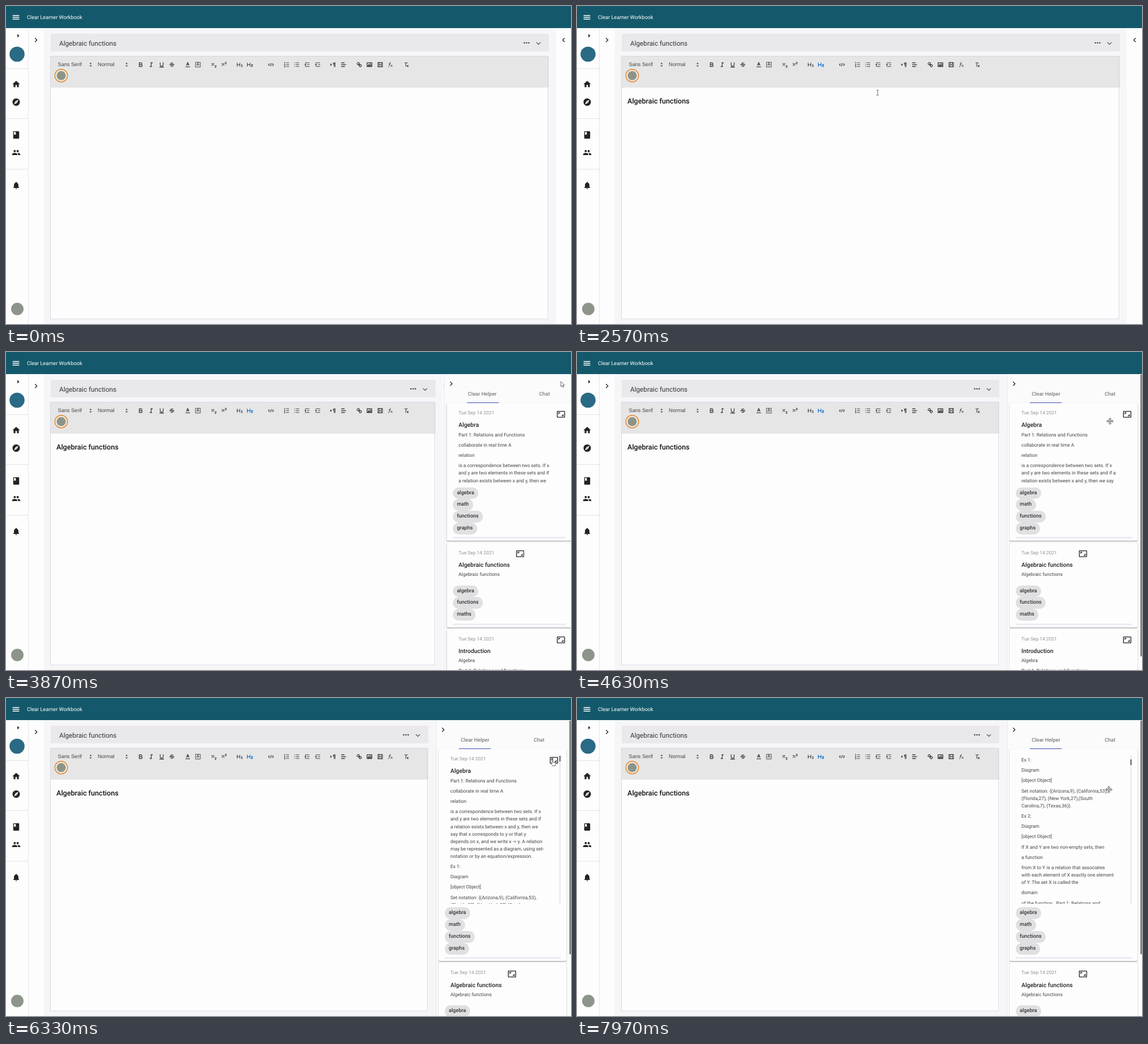
Animation of 998x561 px, one loop 8000 ms. Source, as an HTML page:

```html
<!DOCTYPE html>
<html lang="en">
<head>
<meta charset="utf-8">
<title>Notebook editor</title>
<style>
html, body { margin: 0; width: 100%; height: 100%; overflow: hidden; background: #fdfdfe; }
body { position: relative; font-family: Roboto, sans-serif; text-rendering: geometricPrecision; }
svg { display: block; }
.layer { position: absolute; left: 0; top: 0; }
#panel { position: absolute; left: 759px; top: 39px; width: 239px; height: 522px; overflow: hidden;
  background: #fbfbfc; box-shadow: inset 1px 0 #e2e2e8; }
#panel > svg, #thumb, #ink, .tab { position: absolute; }
.tab { top: 30px; line-height: 13px; font-size: 9.1px; font-weight: 500; color: #7c7c80; transform: translateX(-50%); white-space: nowrap; }
#ink { left: 41px; top: 50px; width: 56px; height: 1.5px; background: #3f51b5; }
#thumb { right: 0; top: 1px; width: 3px; background: #87878a; }
#cards { position: absolute; left: 5px; top: 51.3px; }
.card { position: relative; box-sizing: border-box; padding: 11px 10px 4px 10.5px; margin-bottom: 3.2px; background: #fdfdfe;
  border-radius: 2px; box-shadow: 0 1px 1.5px #0006, 0 0 1px #0004; }
.view { position: relative; max-height: 131px; overflow: hidden; }
.row { display: flex; align-items: flex-start; margin-left: 10.5px; }
.row svg { flex: none; margin: .4px 0 0 10px; }
.text { min-width: 0; font-size: 8.46px; line-height: 13.1px; color: #444; }
.date { height: 14px; line-height: 14px; color: #939397; }
h3 { margin: 7.2px 0 5.2px; font-size: 10.4px; line-height: 13.1px; font-weight: 500; color: #222; }
p { margin: 0 0 5.1px; }
.card:not(.open) br, .card:not(.open) .scroll { display: none; }
.open .view { max-height: 261.8px; height: 261.8px; }
.open .row { margin-right: 3.4px; }
.open p { white-space: nowrap; }
.scroll { position: absolute; right: 0; top: 0; width: 3.5px; height: 100%; background: #efeff2; }
.scroll i { position: absolute; top: 1px; width: 100%; height: 10px; background: #86868a; }
.chips { margin-top: 6.3px; }
.chips span { display: table; height: 20.8px; line-height: 20.8px; padding: 0 7.6px; border-radius: 11px;
  background: #e0e0e2; font-size: 9.1px; font-weight: 500; color: #333; }
.bar { display: block; margin-top: 4.6px; height: 3px; background: #ebebf5; }
</style>
</head>
<body>
<svg id="page" class="layer" width="998" height="561"></svg>
<div id="panel"></div>
<svg id="pointer" class="layer" width="998" height="561"></svg>
<script>
const $ = id => document.getElementById(id);

// Filled 24-unit icons for the app, stroked 18-unit icons for the editor toolbar
const glyphs = {
  menu: 'M3 18h18v-2H3zm0-5h18v-2H3zm0-7v2h18V6z',
  home: 'M10 20v-6h4v6h5v-8h3L12 3 2 12h3v8z',
  compass: 'M12 10.9a1.1 1.1 0 1 0 0 2.2a1.1 1.1 0 0 0 0-2.2zM12 2a10 10 0 1 0 0 20a10 10 0 0 0 0-20zm2.2 12.2L6 18l3.8-8.2L18 6z',
  book: 'M18 2H6c-1.1 0-2 .9-2 2v16c0 1.1.9 2 2 2h12c1.1 0 2-.9 2-2V4c0-1.1-.9-2-2-2zM6 4h5v8l-2.5-1.5L6 12z',
  people: 'M16 11a3 3 0 1 0 0-6a3 3 0 0 0 0 6zM8 11a3 3 0 1 0 0-6a3 3 0 0 0 0 6zm0 2c-2.3 0-7 1.2-7 3.5V19h14v-2.5c0-2.3-4.7-3.5-7-3.5zm8 0-1 .05c1.2.9 2 2 2 3.45V19h6v-2.5c0-2.3-4.7-3.5-7-3.5z',
  bell: 'M12 22c1.1 0 2-.9 2-2h-4c0 1.1.9 2 2 2zm6-6v-5c0-3.1-1.6-5.6-4.5-6.3V4a1.5 1.5 0 0 0-3 0v.7C7.6 5.4 6 7.9 6 11v5l-2 2v1h16v-1z',
  caret: 'M10 17l5-5-5-5z',
  right: 'M10 6L8.6 7.4 13.2 12l-4.6 4.6L10 18l6-6z',
  left: 'M15.4 7.4L14 6l-6 6 6 6 1.4-1.4L10.8 12z',
  down: 'M16.6 8.6L12 13.2 7.4 8.6 6 10l6 6 6-6z',
  more: 'M6 10a2 2 0 1 0 0 4a2 2 0 0 0 0-4zm12 0a2 2 0 1 0 0 4a2 2 0 0 0 0-4zm-6 0a2 2 0 1 0 0 4a2 2 0 0 0 0-4z',
  expand: 'M19 12h-2v3h-3v2h5zM7 9h3V7H5v5h2zm14-6H3c-1.1 0-2 .9-2 2v14c0 1.1.9 2 2 2h18c1.1 0 2-.9 2-2V5c0-1.1-.9-2-2-2zm0 16H3V5h18z'
};
const letterA = 'M5.5 11L9 3l3.5 8M11.6 9H6.4';
const heading = 'M2 4v10M9 4v10M2 9h7';
const lines = 'M7 4h8M7 9h8M7 14h8';
const tools = [
  [238, 'M5 4h4.5a2.5 2.5 0 0 1 0 5H5zM5 9h5.5a2.5 2.5 0 0 1 0 5H5z'],
  [256.5, 'M7 4h6M5 14h6M8 14l2-10'],
  [275, 'M5 3v6a4 4 0 0 0 8 0V3M3 15.5h12'],
  [293, 'M12 6C12 3.7 6 4 6 6.3S12 9 12 11.7 6 14 5.6 12M2.5 9h13'],
  [321, letterA + 'M3 15h12'],
  [339, letterA + 'M9 11v2M2.5 2.5h13v13h-13z', 1.4],
  [367, 'M3 5l7 7M10 5l-7 7M12.5 12.5c.3-2 3-1.4 2.8 0S12.5 15 12.5 16h3.2', 1.7],
  [385, 'M3 5l7 7M10 5l-7 7M12.5 3.5c.3-2 3-1.4 2.8 0S12.5 6 12.5 7h3.2', 1.7],
  [413, heading + 'M12.5 14h4M14.5 14V8.5l-1.5.8', 1.8],
  [431, heading + 'M12.5 10c.3-2.2 3.5-1.8 3.3.2S12.5 12.5 12.5 14h3.8', 1.8],
  [468, 'M5 6L2.5 9 5 12M13 6l2.5 3-2.5 3M10.2 5L7.8 13'],
  [496, lines + 'M2 3l1.3-.7V6M2 8h2L2 10.700h2.200M2 12.500h2v3.200H2', 1.5],
  [514, 'M6 4h9M6 9h9M6 14h9M2 4h2M2 9h2M2 14h2', 1.8],
  [532, 'M3 14h12M3 4h12M9 9h6M5 7v4L3 9z', 1.8],
  [551, 'M3 14h12M3 4h12M9 9h6M3 7v4l2-2z', 1.8],
  [578, 'M2 7v4l2.500-2zM15.500 4H11a2 2 0 0 0 0 4h.5V4v11M14 4v11', 1.700],
  [596, 'M3 4h9M3 9h13M3 14h10'],
  [624, 'M7 11l4-4M8.900 4.600a3.500 3.500 0 0 1-4.300 4.300C3.200 7.500 2 6.400 4.200 4.200s3.300-1 4.700.4zM13.400 9.100a3.500 3.500 0 0 0-4.300 4.300c1.400 1.400 2.500 2.500 4.700.3s1-3.200-.4-4.600z'],
  [642, 'M2.500 4h13v10h-13zM5 12v-1l2-2 1 1 3-3 2 2v3z'],
  [661, 'M3 3h12v12H3zM6 3v12M12 3v12M6 9h6', 1.800],
  [679, 'M3 14.500c2 .5 2.500-1 3-3.500l1-5c.5-2.500 1-3.500 3-3M4.500 7h5.500M9.500 9.500l5 5M14.500 9.500l-5 5', 1.500],
  [707, 'M4 4h9M9 4L7 14M10.500 10.500l4.500 4.500M15 10.500l-4.500 4.500', 1.700]
];

const icon = (name, x, y, color = '#222') =>
  `<path d="${glyphs[name]}" fill="${color}" fill-rule="evenodd" transform="translate(${x - 7.86} ${y - 7.86}) scale(.655)"/>`;
const tool = ([x, d, weight = 2]) =>
  `<path class="tool" d="${d}" fill="none" stroke="#444" stroke-width="${weight}" stroke-linejoin="round" transform="translate(${x - 5.9} 97.6) scale(.655)"/>`;
const rect = (x, y, w, h, fill, rest = '') => `<rect x="${x}" y="${y}" width="${w}" height="${h}" fill="${fill}" ${rest}/>`;
const disc = (x, y, r, fill, rest = '') => `<circle cx="${x}" cy="${y}" r="${r}" fill="${fill}" ${rest}/>`;
const label = (x, y, size, str, rest = '') => `<text x="${x}" y="${y}" font-size="${size}" ${rest}>${str}</text>`;
const arial = 'font-family="Liberation Sans, sans-serif" fill="#444"';
const picker = x => `<path d="M${x - 2} 102.300h4l-2-2.600zM${x - 2} 104.700h4l-2 2.600z" fill="#444"/>`;

$('page').innerHTML =
  rect(67, 39, 931, 522, '#f6f6f9') +
  rect(39, 39, 1, 522, '#e5e5ea') +
  [110, 198, 287.500].map(y => rect(0, y, 39, 1, '#e3e3e8')).join('') +
  rect(79, 49, 880, 31, '#e9e9ec', 'class="wide" rx="1"') +
  rect(79, 89, 880, 464, '#fdfdfe', 'class="wide"') +
  rect(79, 89, 880, 55, '#e6e6e7', 'class="wide"') +
  rect(79, 89, 879, 463.500, 'none', 'class="wide" stroke="#d6d6e2" transform="translate(-.5 -.5)"') +
  label(94, 69.600, 11.750, 'Algebraic functions', 'fill="#333"') +
  label(91.500, 106.200, 9.200, 'Sans Serif', arial) + picker(149.500) +
  label(162, 106.200, 9.200, 'Normal', arial) + picker(213) +
  tools.map(tool).join('') +
  disc(97.500, 122.800, 11.200, '#f0ece2', 'stroke="#e5913d" stroke-width="1.700"') +
  disc(97.500, 122.800, 8, '#8d958a') +
  label(89, 172.300, 12.600, 'Algebraic functions', 'id="typed" font-weight="500" fill="#111"') +
  rect(89, 160, 1, 16, '#222', 'id="caret"') +
  '<g id="edge">' + rect(971, 39, 300, 522, '#fdfdfe') + disc(985.500, 60, 13, '#e1e1e3', 'id="hover"') +
  icon('left', 985, 60) + icon('more', 919.500, 65, '#444') + icon('down', 940.500, 66, '#555') + '</g>' +
  rect(0, 0, 998, 39, '#14596b') + icon('menu', 17.500, 20, '#fff') +
  label(37, 22.800, 9.170, 'Clear Learner Workbook', 'fill="#fff"') +
  icon('caret', 21.500, 52.500) + icon('right', 53, 60) +
  disc(19.500, 85, 13.300, '#2a6a84') +
  icon('home', 18, 138) + icon('compass', 18, 169.500) + icon('book', 18, 227.500) +
  icon('people', 18, 258.500) + icon('bell', 18, 316.500) +
  disc(20, 534.500, 11, '#8d958a');

const notes = [
  'Part 1: Relations and Functions', 'collaborate in real time A', 'relation',
  'is a correspondence between two sets. If x|and y are two elements in these sets and if|a relation exists between x and y, then we|say that x corresponds to y or that y|depends on x, and we write x -&gt; y. A relation|may be represented as a diagram, using set-|notation or by an equation/expression.',
  'Ex 1:', 'Diagram', '[object Object]',
  'Set notation: {(Arizona,9), (California,53),|(Florida,27), (New York,27),(South|Carolina,7), (Texas,36)}.',
  'Ex 2:', 'Diagram', '[object Object]', 'If X and Y are two non-empty sets, then', 'a function',
  'from X to Y is a relation that associates|with each element of X exactly one element|of Y. The set X is called the',
  'domain', 'of the function.&nbsp; Part 1: Relations and|Functions'
];
const card = (title, body, tags) => `<section class="card"><div class="view"><div class="row"><div class="text">
  <div class="date">Tue Sep 14 2021</div><h3>${title}</h3>${body.map(s => `<p>${s.replaceAll('|', ' <br>')}</p>`).join('')}</div>
  <svg width="15.700" height="15.700">${icon('expand', 7.860, 7.860)}</svg></div><div class="scroll"><i></i></div></div>
  <div class="chips">${tags.map(s => `<span>${s}</span>`).join('')}</div><i class="bar"></i></section>`;

$('panel').innerHTML = `<svg width="30" height="40">${icon('right', 13, 17)}</svg>
  <div class="tab">Clear Helper</div><div class="tab">Chat</div><div id="ink"></div><div id="cards">` +
  card('Algebra', notes, ['algebra', 'math', 'functions', 'graphs']) +
  card('Algebraic functions', ['Algebraic functions'], ['algebra', 'functions', 'maths']) +
  card('Introduction', ['Algebra', ...notes], ['algebra', 'math']) + '</div><div id="thumb"></div>';

const shapes = {
  arrow: '<path d="M-3-5v9.200l2.200-2 1.500 3.300 1.500-.7-1.500-3.100h3z"/>',
  beam: '<path d="M-2-4.300h1.500l.5.500.5-.5H2M0-4v8M-2 4.300h1.500l.5-.5.5.5H2" fill="none"/>',
  hand: '<path d="M-2.500-5.500q1-1 1.700 0v4l3.800.8q1.500.4 1 2l-.8 4h-4.700l-3-4q-.3-1.400 1-1l1 .9z"/>',
  move: '<path d="M0-6l2 2.200H.7v3.100h3.100V-2L6 0 3.800 2V.7H.7v3.100H2L0 6l-2-2.200h1.300V.7h-3.100V2L-6 0l2.200-2v1.300h3.100v-3.100H-2z"/>'
};
$('pointer').innerHTML = '<g id="mouse" fill="#fff" stroke="#444" stroke-width=".8">' +
  Object.entries(shapes).map(([name, d]) => `<g data-kind="${name}">${d}</g>`).join('') + '</g>';

// time, x, y
const path = [
  [0, 590, 250], [30, 590, 250], [830, 431, 105], [2270, 431, 105], [2570, 531, 153], [3070, 952, 70], [3250, 983, 57],
  [4150, 983, 57], [4630, 941.500, 122], [5070, 826, 501], [5430, 826, 501], [5730, 967, 114.500],
  [7270, 967, 114.500], [7600, 939.500, 161.500], [8000, 939.500, 161.500]
];
const position = t => {
  const i = path.findIndex(k => k[0] > t);
  const [a, b] = [path[i - 1], path[i]];
  const u = (t - a[0]) / (b[0] - a[0]);
  return [a[1] + (b[1] - a[1]) * u, a[2] + (b[2] - a[2]) * u];
};
const pointerKind = (t, x, y) => {
  if (t < 4000) return y > 144 ? 'beam' : t > 800 && t < 2300 ? 'hand' : 'arrow';
  if (t > 5690 && t < 7330) return 'hand';
  return y > 91 ? 'move' : 'arrow';
};

const all = selector => [...document.querySelectorAll(selector)];
const wide = all('.wide'), cards = all('.card'), tabs = all('.tab'), kinds = all('[data-kind]');
const wideWidths = wide.map(el => +el.getAttribute('width'));
const h2 = all('.tool')[9];
const row = all('.row')[0], scrollThumb = all('.scroll i')[0];
const show = (el, on) => { el.style.display = on ? '' : 'none'; };

function draw(t) {
  const slide = 1 - (1 - Math.min(1, Math.max(0, (t - 3649) / 400))) ** 3.5;
  const shift = 213 * slide, squeeze = 100 * (1 - slide);
  wide.forEach((el, i) => el.setAttribute('width', wideWidths[i] - shift));
  $('edge').setAttribute('transform', `translate(${-shift})`);
  show($('hover'), t > 3200 && t < 4050);

  h2.setAttribute('stroke', t >= 1170 ? '#06c' : '#444');
  show($('typed'), t >= 1630);
  show($('caret'), t >= 1170 && t < 2000);
  $('caret').setAttribute('x', t < 1630 ? 89 : 200);

  show($('panel'), slide > 0);
  $('panel').style.transform = `translateX(${239 * (1 - slide)}px)`;
  cards.forEach(el => { el.style.width = 226 - squeeze + 'px'; });
  tabs.forEach((el, i) => { el.style.left = 13 + (226 - squeeze) * (.25 + i / 2) + 'px'; });

  const expanded = t >= 6130;
  const scroll = Math.max(0, (t - 7647) * .582);
  cards[0].classList.toggle('open', expanded);
  $('thumb').style.height = (expanded ? 412 : 497) + 'px';
  row.style.transform = `translateY(${-scroll}px)`;
  scrollThumb.style.transform = `translateY(${scroll * .034}px)`;

  const [x, y] = position(t), kind = pointerKind(t, x, y);
  show($('mouse'), t >= 30);
  $('mouse').setAttribute('transform', `translate(${x} ${y})`);
  kinds.forEach(el => show(el, el.dataset.kind === kind));
}

let start;
function tick(now) {
  start ??= now;
  draw((now - start) % 8000);
  requestAnimationFrame(tick);
}
draw(0);
requestAnimationFrame(tick);
</script>
</body>
</html>
```
